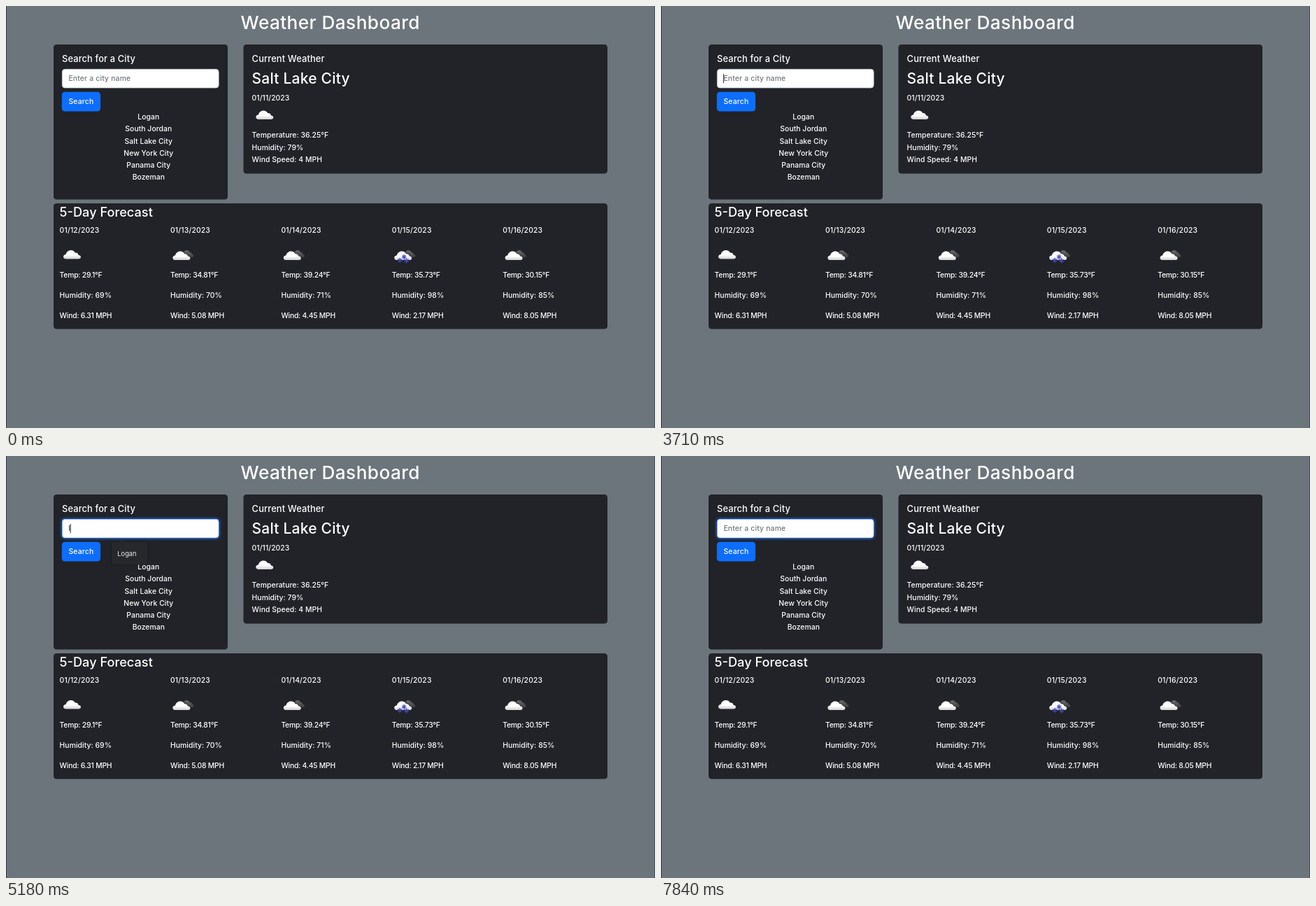
An HTML page that plays this animation: 928 by 603 pixels, repeating every 8000 ms.

```html
<!DOCTYPE html>
<html lang="en">
<head>
<meta charset="utf-8">
<title>Weather Dashboard</title>
<style>
  html, body { margin: 0; width: 100%; height: 100%; overflow: hidden; background: #6c757c; }
  svg { display: block; width: 100%; height: 100%; }
  text { font-family: Inter, Roboto, sans-serif; font-weight: 500; font-optical-sizing: none; white-space: pre; fill: #fff; }
  .h1 { font-size: 26.2px; letter-spacing: .016em; }
  .h2 { font-size: 21px; letter-spacing: .01em; }
  .h3 { font-size: 18.2px; }
  .h5 { font-size: 12.9px; letter-spacing: .009em; }
  .body { font-size: 10.4px; letter-spacing: .004em; }
  .tight { letter-spacing: -.024em; }
  .wide { letter-spacing: .014em; }
  .field { font-size: 10.4px; letter-spacing: .016em; }
  .menu { font-size: 9.3px; font-weight: 400; fill: #ececee; }
  .mid { text-anchor: middle; }
</style>
</head>
<body>
<svg id="stage" viewBox="0 0 928 603" xmlns="http://www.w3.org/2000/svg">
  <defs>
    <linearGradient id="white" x2="0" y2="1">
      <stop offset=".55" stop-color="#fff"/><stop offset="1" stop-color="#cfcfd0"/>
    </linearGradient>
    <linearGradient id="grey" x2="0" y2="1">
      <stop offset="0" stop-color="#6a6a6c"/><stop offset="1" stop-color="#3c3c3f"/>
    </linearGradient>
    <path id="cloud" d="M4 12.5C1.5 12.4 0 11.1 0 9.3C0 7.5 1.5 6.2 3.6 6C4.4 2.5 7.2 0 10.8 0C13.8 0 16 1.4 16.9 3.7C19.3 3.1 21.3 4.7 21.6 7C23.7 7 25 8.2 25 9.8C25 11.5 23.5 12.5 21.5 12.5Z"/>
    <path id="flake" d="M0-3.4V3.4M-3-1.7L3 1.7M-3 1.7L3-1.7" stroke="#4147b6" stroke-width="1.5"/>
  </defs>
</svg>
<script>
const LOOP = 8000;
const CARD = '#212328';
const stage = document.getElementById('stage');

function add(tag, attrs, parent = stage) {
  const el = document.createElementNS('http://www.w3.org/2000/svg', tag);
  for (const key in attrs) el.setAttribute(key, attrs[key]);
  return parent.appendChild(el);
}

function label(str, x, y, cls, parent) {
  const el = add('text', { x, y, class: cls }, parent);
  el.textContent = str;
  return el;
}

function box(x, y, width, height, fill, rx = 4.3, parent) {
  return add('rect', { x, y, width, height, fill, rx }, parent);
}

function icon(kind, x, y) {
  const g = add('g', { transform: `translate(${x} ${y})` });
  const front = { href: '#cloud', fill: 'url(#white)' };
  if (kind === 'cloud') {
    add('use', front, g);
    return;
  }
  add('use', { href: '#cloud', fill: 'url(#grey)', transform: 'translate(12.5 0) scale(.7 .82)' }, g);
  front.transform = 'translate(0 1.6)';
  add('use', { ...front, stroke: CARD, 'stroke-width': 1.4 }, g);
  add('use', front, g);
  if (kind === 'snow')
    for (const [fx, fy] of [[14, 9.5], [8, 14.5], [17.5, 15]])
      add('use', { href: '#flake', transform: `translate(${fx} ${fy})` }, g);
}

// Page and cards
box(0, 0, 928, 603, '#6c757c', 0);
box(0, 0, 1, 603, '#343a40', 0);
box(927, 0, 1, 603, '#454c53', 0);
label('Weather Dashboard', 463.7, 33, 'h1 mid');
box(68, 55, 249, 221.5, CARD);
box(339.5, 55, 520.5, 184.5, CARD);
box(68, 282, 792, 179.5, CARD);

// Search panel
label('Search for a City', 80, 80.3, 'h5');
const ring = box(80, 90, 224.5, 27.3, '#0d6efd');
const input = box(80.35, 90.35, 223.8, 26.6, '#fff', 4);
input.setAttribute('stroke-width', .8);
const hint = label('Enter a city name', 89.4, 107, 'field');
hint.style.fill = '#70777d';
const typed = label('', 89.4, 107, 'field');
typed.style.fill = '#212529';
const caret = box(0, 97, .9, 13.3, '#222', 0);
box(79.8, 122.8, 55.3, 27.6, '#0d6efd');
label('Search', 107.4, 140.2, 'body wide mid');
['Logan', 'South Jordan', 'Salt Lake City', 'New York City', 'Panama City', 'Bozeman']
  .forEach((city, i) => label(city, 203.8, 162.2 + 17.2 * i, 'body mid'));

// Current weather
label('Current Weather', 351.6, 80.3, 'h5');
label('Salt Lake City', 351.6, 111.4, 'h2');
label('01/11/2023', 351.6, 135.3, 'body');
icon('cloud', 357.3, 149.4);
label('Temperature: 36.25°F', 351.6, 188.3, 'body');
label('Humidity: 79%', 351.6, 205.5, 'body');
label('Wind Speed: 4 MPH', 351.6, 222.7, 'body');

// Forecast
label('5-Day Forecast', 76.6, 301, 'h3');
[
  ['cloud', 29.1, 69, '6.31'],
  ['broken', 34.81, 70, '5.08'],
  ['broken', 39.24, 71, '4.45'],
  ['snow', 35.73, 98, '2.17'],
  ['broken', 30.15, 85, '8.05'],
].forEach(([kind, temp, humidity, wind], i) => {
  const x = 76.6 + 158.4 * i;
  label(`01/${12 + i}/2023`, x, 324.2, 'body wide');
  icon(kind, x + (kind === 'cloud' ? 5.4 : 3.4), 349);
  label(`Temp: ${temp}°F`, x, 388.4, 'body tight');
  label(`Humidity: ${humidity}%`, x, 417, 'body');
  label(`Wind: ${wind} MPH`, x, 445.5, 'body tight');
});

// Suggestions
const menu = add('g', {});
const menuShade = box(150, 122.5, 0, 0, '#18191c', 3, menu);
add('path', { d: 'M161 123.5L166 119.8L171 123.5Z', fill: '#27282c' }, menu);
const menuBox = box(151, 123, 0, 0, '#27282c', 2, menu);
label('Logan', 159.3, 143, 'menu', menu);
const second = label('South Jordan', 159.3, 168.8, 'menu', menu);

const QUERY = 'los angeles';
const KEYS = [5180, 5390, 5670, 6090, 6230, 6300, 6510, 6720, 6860, 7000, 7280];
const FOCUS = 3710, OPEN = 3780, SENT = 7770;
const within = (t, from, to) => t >= from && t < to;
const show = (el, on) => el.setAttribute('visibility', on ? 'inherit' : 'hidden');

function focusLevel(t) {
  if (t < FOCUS) return 0;
  return t < OPEN ? .15 : t < 3850 ? .6 : 1;
}

function render(t) {
  const k = focusLevel(t), grow = 2.87 * k;
  ring.setAttribute('x', 80 - grow);
  ring.setAttribute('y', 90 - grow);
  ring.setAttribute('width', 224.5 + 2 * grow);
  ring.setAttribute('height', 27.3 + 2 * grow);
  ring.setAttribute('rx', 4.3 + grow);
  ring.setAttribute('opacity', k * .3);
  const mix = (a, b) => Math.round(a + (b - a) * k);
  input.setAttribute('stroke', `rgb(${mix(206, 134)},${mix(212, 183)},${mix(218, 254)})`);

  const count = t < SENT ? KEYS.filter(key => t >= key).length : 0;
  typed.textContent = QUERY.slice(0, count);
  show(hint, !count);
  caret.setAttribute('x', 89 + (count ? typed.getComputedTextLength() : 0));
  show(caret, within(t, FOCUS, 4270) || within(t, 4760, 7840));

  const both = t < KEYS[0];
  const w = both ? 85.7 : 51, h = both ? 57.7 : 32;
  menuBox.setAttribute('width', w);
  menuBox.setAttribute('height', h);
  menuShade.setAttribute('width', w + 2);
  menuShade.setAttribute('height', h + 1.5);
  menuShade.setAttribute('opacity', .5);
  show(second, both);
  show(menu, within(t, OPEN, KEYS[2]));
}

const start = performance.now();
function tick() {
  render((performance.now() - start) % LOOP);
  requestAnimationFrame(tick);
}
tick();
</script>
</body>
</html>
```
